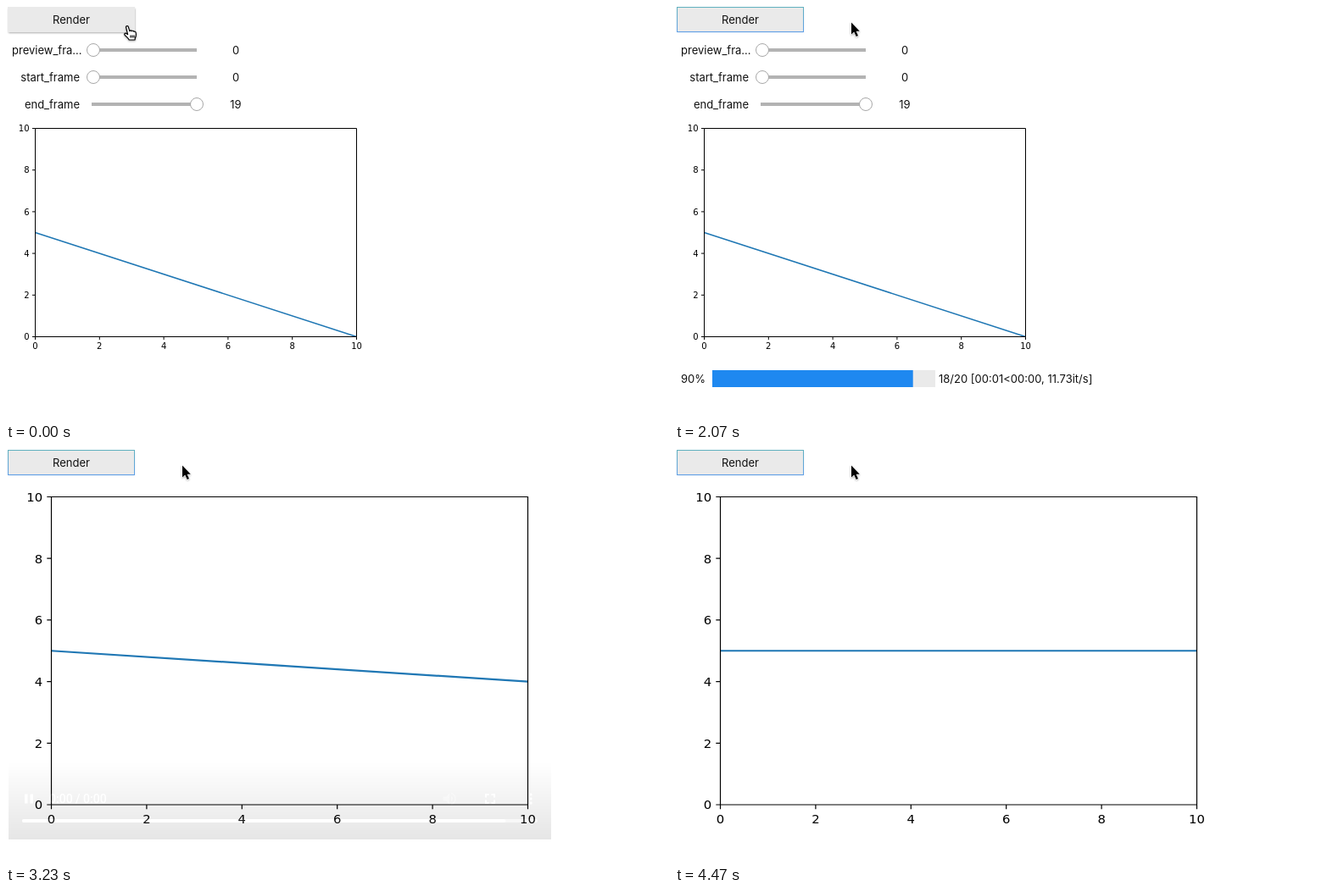
An HTML page for the animation above (4.51 s loop, 782x490 px).

```html
<!DOCTYPE html>
<html lang="en">
<head>
<meta charset="utf-8">
<title>Render widget</title>
<style>
  html, body { margin: 0; width: 100%; height: 100%; overflow: hidden; background: #fff; }
  svg { display: block; width: 782px; height: 490px; }
  .ui { font: 13px Inter, "Open Sans", sans-serif; fill: #111; }
  .axis { font-family: "DejaVu Sans", sans-serif; fill: #000; }
  .clock { font: 500 14px Roboto, Arial, sans-serif; fill: #fff; }
  .mid { text-anchor: middle; }
  .end { text-anchor: end; }
</style>
</head>
<body>
<svg viewBox="0 0 782 490" xmlns="http://www.w3.org/2000/svg">
  <defs>
    <linearGradient id="shade" x2="0" y2="1">
      <stop offset="0" stop-opacity="0"/>
      <stop offset="1" stop-opacity="1"/>
    </linearGradient>
    <linearGradient id="ring" x2="0" y2="1">
      <stop offset="0" stop-color="#5fb0bf"/>
      <stop offset="1" stop-color="#5f9fe6"/>
    </linearGradient>
    <filter id="soft" x="-10%" y="-50%" width="120%" height="200%">
      <feGaussianBlur stdDeviation="1.3"/>
    </filter>
    <filter id="drop" x="-50%" y="-50%" width="200%" height="200%">
      <feDropShadow dx="0" dy="1" stdDeviation=".8" flood-opacity=".35"/>
    </filter>
  </defs>

  <g id="button">
    <rect id="glow" x="3" y="3" width="149" height="28.5" fill="#000" opacity=".4" filter="url(#soft)"/>
    <rect id="face" x="2" y="1" width="150" height="30" fill="#eaeaea"/>
    <rect id="focus" x="2.5" y="1.5" width="149" height="29" fill="none" stroke="url(#ring)"/>
    <text class="ui mid" x="77" y="21">Render</text>
  </g>

  <g id="panel"></g>

  <g id="progress">
    <text id="percent" class="ui" x="7" y="445"></text>
    <rect id="track" y="430" height="20" fill="#eaeaea"/>
    <rect id="bar" y="430" height="20" fill="#1e88f0"/>
    <text id="stats" class="ui" x="311" y="445"></text>
  </g>

  <g id="video">
    <rect x="3" y="34" width="640" height="427" fill="#fff"/>
    <g id="film"></g>
    <g id="controls">
      <rect x="3" y="368" width="640" height="93" fill="url(#shade)"/>
      <path d="M22 407.5h3.5v11H22zM28.5 407.5H32v11h-3.5z" fill="#fff"/>
      <text class="clock" x="51" y="418">0:00 / 0:00</text>
      <path transform="translate(513 402.8) scale(.85)" fill="#fff" opacity=".35"
        d="M3 9v6h4l5 5V4L7 9zM16.5 12c0-1.8-1-3.3-2.5-4v8c1.500-.7 2.500-2.200 2.500-4zM14 3.200v2.100c2.900.9 5 3.500 5 6.700s-2.100 5.800-5 6.700v2.100c4-.9 7-4.500 7-8.800s-3-7.900-7-8.800z"/>
      <path d="M566 411.500V408h3.500M572.500 408H576v3.500M576 414.500V418h-3.500M569.500 418H566v-3.500"
        fill="none" stroke="#fff" stroke-width="2"/>
      <g fill="#fff">
        <circle cx="619" cy="408" r="1.700"/>
        <circle cx="619" cy="413" r="1.700"/>
        <circle cx="619" cy="418" r="1.700"/>
      </g>
      <rect x="19" y="437" width="608" height="4" rx="2" fill="#c2c2c2"/>
      <rect id="played" x="19" y="437" height="4" rx="2" fill="#fff"/>
    </g>
  </g>

  <g id="cursor" filter="url(#drop)">
    <path id="hand" transform="translate(-6 -2)" fill="#fff" stroke="#000" stroke-width="1.200" stroke-linejoin="round"
      d="M3.600 3.200C3.200 1.600 5.600.8 6.200 2.400L7.800 7.600C8.400 6.600 10 6.600 10.400 7.700C11.200 6.900 12.600 7.200 12.900 8.300C13.800 7.800 15 8.400 15.200 9.600C15.600 12 15.400 14 14.400 15.600L14 18H7.200C6.400 16 4.200 14.400 2.200 12.400C1 11 2.400 9.600 3.800 10.400L5.600 11.600ZM9 12.500v3M11 12.500v3M13 12.500v3"/>
    <path id="arrow" fill="#000" stroke="#fff" stroke-width="1" paint-order="stroke"
      d="M0 0V14L3.200 11L5.700 16.500L8 15.500L5.600 10.200H9.800Z"/>
  </g>
</svg>
<script>
const LOOP = 4510;
const PRESS = 80, RELEASE = 190;          // mouse button
const MOVE = 350, REST = 950;             // pointer travel
const COUNT = 450, STEP = 171;            // progress counter
const SHOW = 2200;                        // video replaces the widgets
const FADE = 3035, FADE_LEN = 300;        // player controls

const $ = id => document.getElementById(id);
const clamp = v => Math.min(1, Math.max(0, v));
const smooth = u => u * u * (3 - 2 * u);
const show = (id, on) => $(id).setAttribute('visibility', on ? 'inherit' : 'hidden');
const set = (id, attrs) => {
  for (const k in attrs) $(id).setAttribute(k, attrs[k]);
};

// Axes from 0 to 10 with a line that starts at 5; k scales type and strokes.
function chart(id, x, y, w, h, k) {
  const label = (cls, px, py, v) =>
    `<text class="axis ${cls}" font-size="${10 * k}" x="${px}" y="${py}">${v}</text>`;
  let ticks = '', text = '';
  for (let v = 0; v <= 10; v += 2) {
    const tx = x + w * v / 10, ty = y + h - h * v / 10;
    ticks += `M${tx} ${y + h}v${3.5 * k}M${x} ${ty}h${-3.5 * k}`;
    text += label('mid', tx, y + h + 14.7 * k, v) + label('end', x - 7 * k, ty + 3.65 * k, v);
  }
  return `<line id="${id}" x1="${x}" y1="${y + h / 2}" x2="${x + w}" y2="${y + h}"
      stroke="#1f77b4" stroke-width="${1.5 * k}"/>
    <path d="M${x} ${y}h${w}v${h}h${-w}z${ticks}" fill="none" stroke="#000" stroke-width="${k > 1 ? 1.2 : 1}"/>${text}`;
}

function slider(y, name, value, knob) {
  const long = name.endsWith('…');
  return `<text class="ui ${long ? '' : 'end'}" x="${long ? 7 : 87}" y="${y + 5}">${name}</text>
    <rect x="101" y="${y - 2}" width="124" height="4" fill="#b3b3b3"/>
    <circle cx="${knob}" cy="${y}" r="7.5" fill="#fff" stroke="#a8a8a8"/>
    <text class="ui mid" x="271" y="${y + 5}">${value}</text>`;
}

$('panel').innerHTML =
  slider(52, 'preview_fra…', 0, 103) +
  slider(84, 'start_frame', 0, 103) +
  slider(116, 'end_frame', 19, 225) +
  chart('preview', 34.5, 144.5, 379, 246, 1);
$('film').innerHTML = chart('beam', 53.5, 56.5, 562, 363.5, 1.4815);

function drawPointer(t) {
  const u = smooth(clamp((t - MOVE) / (REST - MOVE)));
  const x = 144 + 64 * u, y = 24 - 4.5 * u;
  const over = x < 152;
  const down = t >= PRESS && t < RELEASE;
  set('cursor', { transform: `translate(${x} ${y})` });
  show('hand', over);
  show('arrow', !over);
  show('focus', t >= PRESS);
  set('face', { fill: down ? '#bdbdbd' : '#eaeaea' });
  set('glow', { opacity: over ? 0.45 : 0.14, fill: over ? '#000' : '#1560c0' });
}

function drawProgress(t) {
  const n = Math.min(20, 2 * Math.max(0, Math.floor((t - COUNT) / STEP)));
  const rate = 11.55 + (n - 10) * 0.0225;
  const time = s => '00:0' + Math.floor(s);
  const tail = n ? `${time((20 - n) / rate)}, ${rate.toFixed(2)}` : '?, ?';
  $('percent').textContent = n * 5 + '%';
  $('stats').textContent = `${n}/20 [${time(n / rate)}<${tail}it/s]`;
  const x = Math.round(15 + $('percent').getComputedTextLength());
  set('track', { x, width: 307 - x });
  set('bar', { x, width: (307 - x) * n / 20 });
}

function drawVideo(t) {
  // Playback is one picture late until the player has settled.
  const lag = t < 2700 ? 1 : 0;
  const i = Math.max(0, Math.floor((t - 2250) / 40) - lag) % 20;
  const top = 10 - Math.abs(10 - i);
  set('beam', { y2: 420 - 36.35 * top });
  const beat = Math.max(0, Math.floor((t - 2290) / 250)) * 250 % 800;
  set('played', { width: 6 + 602 * beat / 800 });
  const u = clamp((t - FADE) / FADE_LEN);
  set('controls', { opacity: Math.pow(1 - u, 2.2) });
}

function draw(t) {
  const playing = t >= SHOW;
  const busy = t >= COUNT && !playing;
  show('panel', !playing);
  show('progress', busy);
  show('video', playing);
  drawPointer(t);
  if (busy) drawProgress(t);
  if (playing) drawVideo(t);
}

const start = performance.now();
function tick() {
  draw((performance.now() - start) % LOOP);
  requestAnimationFrame(tick);
}
tick();
</script>
</body>
</html>
```
